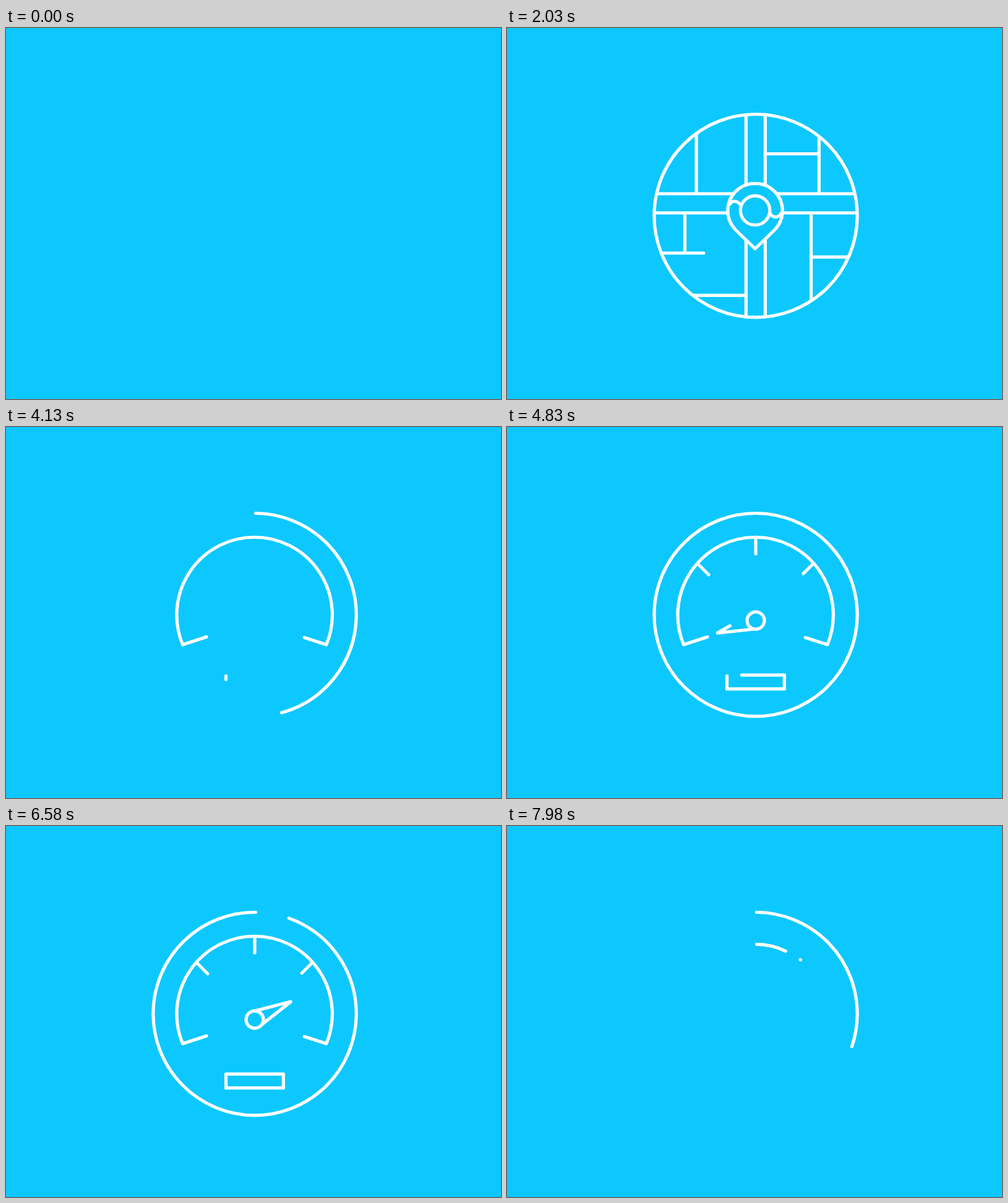
Write an HTML page that moves like this. It is 800 by 600 pixels and loops after 8 s.

```html
<!DOCTYPE html>
<html lang="en">
<head>
<meta charset="utf-8">
<title>Map and gauge</title>
<style>
  html, body { margin: 0; width: 100%; height: 100%; overflow: hidden; background: #0cc8ff; }
  svg { display: block; width: 100vw; height: 100vh; }
</style>
</head>
<body>
<svg id="stage" viewBox="0 0 800 600" fill="none" stroke="#fff" stroke-width="5.2"
     stroke-linecap="round" stroke-linejoin="round">
  <g id="map"></g>
  <g id="pin" fill="#0cc8ff">
    <path d="M-31.5 31.5A44.2 44.2 0 1 1 31.5 31.5L0 62Z"/>
    <path fill="none" d="M-41-10C-36-18-27-15-22-7M23 1C26 14 38 12 42 5"/>
    <circle r="23.7"/>
  </g>
  <g id="dial"></g>
  <g id="needle"></g>
</svg>
<script>
const LOOP = 8000, STEP = 70, NEVER = 1e6;
const CX = 402, CY = 303.7, R = 164.2;
const $ = id => document.getElementById(id);
const strokes = [];

// Smooth progress from 0 to 1
const ease = (t, start, length) => {
  const u = Math.min(1, Math.max(0, (t - start) / length));
  return u * u * (3 - 2 * u);
};

// Point at a clockwise angle from the top
const polar = (r, deg, cy = CY) => {
  const a = deg * Math.PI / 180;
  return `${CX + r * Math.sin(a)} ${cy - r * Math.cos(a)}`;
};

const arc = (r, from, to, cy = CY) => {
  const mid = (from + to) / 2, go = `A${r} ${r} 0 0 1 `;
  return `M${polar(r, from, cy)}${go}${polar(r, mid, cy)}${go}${polar(r, to, cy)}`;
};

// A stroke draws itself in, then leaves from its end, or from its start when tail is set
function add(group, d, start, leave, { grow = 1000, fade = 1000, tail = false } = {}) {
  const el = document.createElementNS('http://www.w3.org/2000/svg', 'path');
  el.setAttribute('d', d);
  el.setAttribute('pathLength', 1);
  $(group).append(el);
  strokes.push({ el, start, leave, grow, fade, tail });
}

const ring = arc(R, 0.5, 360.5);
add('map', ring, -20, 2252, { grow: 1330 });

// Streets
[
  ['M564 299H240'], ['M386.3 464V142'], ['M306 266V172'],
  ['M491.5 302V440'], ['M495 370.3H552'], ['M385 432.3H301'],
  ['M318 364H252', 680, 2717],
  ['M245 268H401', 833, 3000], ['M560 268H402', 833, 3000],
  ['M504.3 179V266', 800, 3060], ['M504 203.5H419', 833, 3060],
  ['M417.3 303V141', 912, 2828], ['M417.3 303V465', 912, 2828],
  ['M287.5 301V362', 1150, 3070]
].forEach(([d, start = 912, leave = 2908]) => add('map', d, start, leave));

// Gauge
add('dial', ring, 3504, 6440, { grow: 1330, tail: true });
add('dial', 'M324 339.5L285.5 352A125.7 125.7 0 1 1 517.8 352L482 340.5', 3450, 7310,
  { grow: 650, fade: 640, tail: true });
add('dial', 'M355.5 402.5V423.7H448.3V401.2H355.5Z', 4035, 7310, { fade: 600, tail: true });
['M309 222L326 239', 'M402 180V205', 'M494 222L478 238'].forEach((d, i) =>
  add('dial', d, 4200 + i * 100, 7050 + i * 70, { grow: 500, fade: 450 }));

const HUB = 313;
add('needle', arc(14, 0, 360, HUB), 4250, 6950, { grow: 600, fade: 500 });
add('needle', `M${polar(14, -62, HUB)}L402 248L${polar(14, 62, HUB)}`, 4450, 6850,
  { grow: 600, fade: 500 });

// Next icon
add('dial', ring, 7496, NEVER, { grow: 1330 });
add('dial', arc(112.3, 0.8, 360), 7767, NEVER, { grow: 1330 });
add('dial', arc(113.3, 39.5, 80), 7940, NEVER);

function draw(t) {
  for (const { el, start, leave, grow, fade, tail } of strokes) {
    const shown = ease(t, start, grow), gone = ease(t, leave, fade);
    const from = tail ? gone : 0, to = tail ? shown : shown - gone;
    const size = to - from;
    el.style.display = size > 0.002 ? '' : 'none';
    el.setAttribute('stroke-dasharray', size > 0.9999 ? 'none' : `${Math.max(0, size)} 3`);
    el.setAttribute('stroke-dashoffset', -from);
  }

  const scale = ease(t, 450, 600) - ease(t, 2675, 1000);
  $('pin').style.display = scale > 0.005 ? '' : 'none';
  $('pin').setAttribute('transform', `translate(401 295) scale(${scale})`);

  const angle = -108 + 171.6 * ease(t, 4890, 1000);
  $('needle').setAttribute('transform', `rotate(${angle} ${CX} ${HUB})`);
}

const begin = performance.now();
function tick() {
  const t = (performance.now() - begin) % LOOP;
  draw(Math.floor(t / STEP) * STEP);
  requestAnimationFrame(tick);
}
tick();
</script>
</body>
</html>
```
